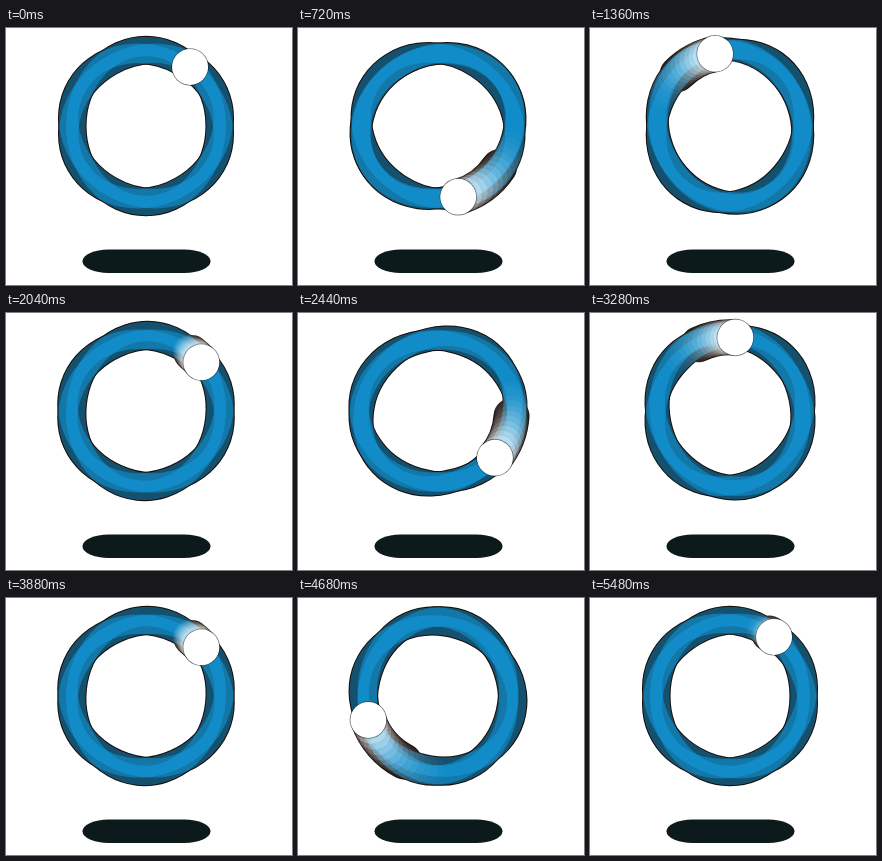
Write an HTML page with a canvas that moves like this. It is 286 px wide and 257 px high and loops after 5520 ms.

```html
<!DOCTYPE html>
<html lang="en">
<head>
<meta charset="utf-8">
<title>Orbit loader</title>
<style>
  html, body { margin: 0; width: 100%; height: 100%; overflow: hidden; background: #fff; }
  canvas { display: block; }
</style>
</head>
<body>
<canvas id="stage" width="286" height="257"></canvas>
<script>
const ctx = document.getElementById('stage').getContext('2d');
const TAU = Math.PI * 2;
const CX = 140, CY = 98;
const PERIOD = 1840, TRAVEL = 1800, STEP = 40;
const ORBIT = 73.7, BALL = 18, START = 36.7 * Math.PI / 180;
const GHOSTS = 12, TRAIL = 200;
const DARK = '#160c08';

// Angle travelled since the start of the turn
function turn(ms) {
  const k = Math.min(1, Math.max(0, (ms + 10) / TRAVEL));
  return TAU * (1 - Math.cos(Math.PI * k)) / 2;
}

function ring(angle, width, color) {
  ctx.beginPath();
  ctx.ellipse(CX, CY, 70.2, 79.5, angle, 0, TAU);
  ctx.lineWidth = width;
  ctx.strokeStyle = color;
  ctx.stroke();
}

function disc(ms, radius, color) {
  const a = START + turn(ms);
  ctx.beginPath();
  ctx.arc(CX + ORBIT * Math.sin(a), CY - ORBIT * Math.cos(a), radius, 0, TAU);
  ctx.fillStyle = color;
  ctx.fill();
}

// Dark band that carries the trail where it leaves the rings
function drawTrailBase(ms) {
  const angle = t => START + turn(t) - TAU / 4;
  ctx.beginPath();
  ctx.arc(CX, CY, ORBIT, angle(ms - TRAIL * 0.7), angle(ms));
  ctx.lineWidth = BALL * 2;
  ctx.lineCap = 'round';
  ctx.strokeStyle = DARK;
  ctx.stroke();
}

// Each ring makes half a turn, one of them backwards
function drawRings(ms) {
  const half = turn(ms) / 2;
  const angles = [half, TAU / 6 + half, -TAU / 6 - half];
  angles.forEach(a => ring(a, 21.5, DARK));
  angles.forEach(a => ring(a, 19.5, 'rgba(18,165,238,.45)'));
}

function drawBall(ms) {
  for (let i = 0; i < GHOSTS; i++) {
    const u = i / GHOSTS;
    disc(ms - TRAIL * (1 - u), BALL - 0.5, `rgba(255,255,255,${0.02 + 0.3 * u * u})`);
  }
  disc(ms, BALL + 0.7, 'rgba(20,20,20,.55)');
  disc(ms, BALL, '#fff');
}

function drawShadow() {
  ctx.beginPath();
  ctx.roundRect(76.5, 221.5, 128, 23.5, { x: 26, y: 11.7 });
  ctx.fillStyle = '#0d1a1c';
  ctx.fill();
}

function frame(now) {
  const ms = Math.floor(now / STEP) * STEP % PERIOD;
  ctx.fillStyle = '#fff';
  ctx.fillRect(0, 0, 286, 257);
  drawShadow();
  drawTrailBase(ms);
  drawRings(ms);
  drawBall(ms);
  requestAnimationFrame(frame);
}
frame(0);
</script>
</body>
</html>
```
